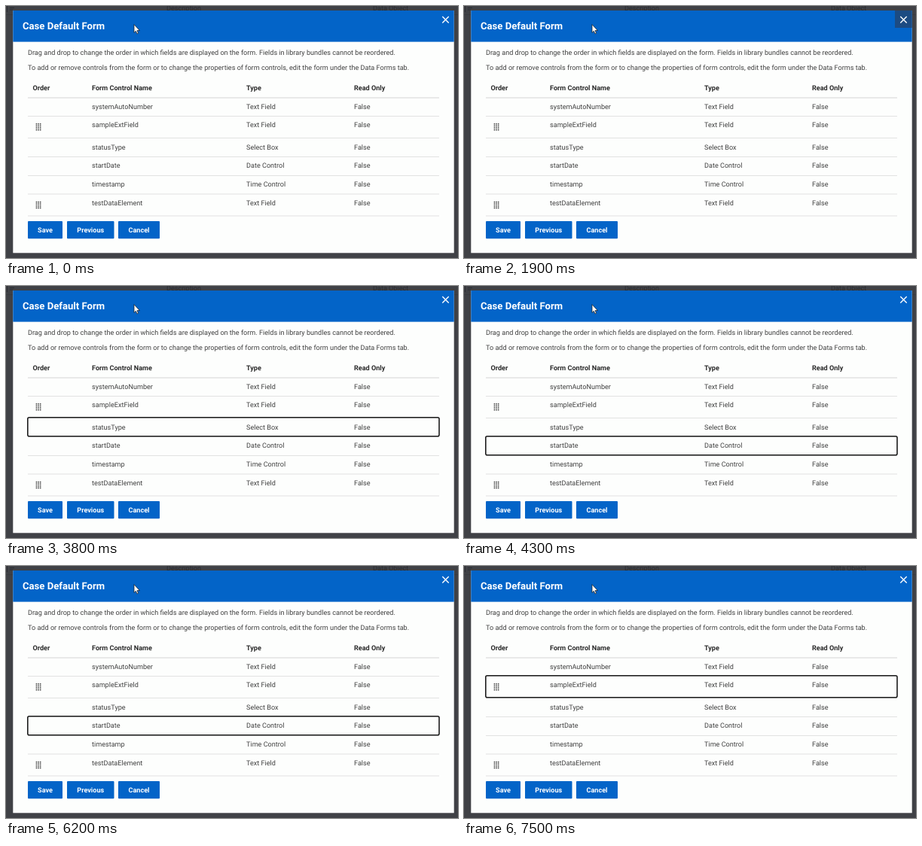
Recreate the animation shown at these times as an HTML page. Size 600x335 px, loop 8 s.

```html
<!DOCTYPE html>
<html lang="en">
<head>
<meta charset="utf-8">
<title>Case Default Form</title>
<style>
  html, body { margin: 0; width: 100%; height: 100%; overflow: hidden; background: #404146; }
  svg { display: block; width: 600px; height: 335px; }
  text { font: 9.1px Roboto, sans-serif; fill: #404040; text-rendering: geometricPrecision; }
  .head { font-weight: 700; fill: #2a2a2a; }
  .title { font-size: 13.1px; font-weight: 700; fill: #fff; }
  .button { font-weight: 700; fill: #fff; text-anchor: middle; }
  .behind { fill: #2b2d31; }
</style>
</head>
<body>
<svg id="stage" viewBox="0 0 600 335"></svg>
<script>
const LOOP = 8000;
const COLUMNS = [35.4, 114, 319, 462];
const LINES = [122, 146.5, 175.5, 200.5, 225.5, 250, 279];
const ROWS = [
  ['systemAutoNumber', 'Text Field', 136.8],
  ['sampleExtField', 'Text Field', 161.2, 160.8],
  ['statusType', 'Select Box', 190.6],
  ['startDate', 'Date Control', 215.4],
  ['timestamp', 'Time Control', 240],
  ['testDataElement', 'Text Field', 264.8, 264.6]
];
// [time, focused row]; -1 is the close button, null is nothing
const FOCUS = [
  [0, null], [1500, -1], [2200, 0], [3300, 1], [3700, 2], [4100, 3],
  [4700, 4], [5000, 5], [5700, 4], [6000, 3], [6600, 2], [7000, 1]
];

const stage = document.getElementById('stage');

function add(name, attrs, content = '') {
  const node = document.createElementNS('http://www.w3.org/2000/svg', name);
  for (const key in attrs) node.setAttribute(key, attrs[key]);
  node.textContent = content;
  return stage.appendChild(node);
}
const box = (x, y, width, height, fill, rx = 0) => add('rect', { x, y, width, height, fill, rx });
const label = (x, y, content, kind = '') => add('text', { x, y, class: kind }, content);

// Dimmed page and dialog
box(0, 0, 600, 335, '#404146');
label(213, 5.5, 'Description', 'behind');
label(487, 5.5, 'Data Object', 'behind');
add('path', { d: 'M1.5 0V8M5 2.5H11M5 5H9', stroke: '#2b2d31', fill: 'none' });
box(0, 11, 600, 1, '#393b3f');
box(9.3, 6, 585.4, 322.3, '#fdfefd');
box(9.3, 6, 585.4, 41.6, '#0364c8');
label(22, 31.1, 'Case Default Form', 'title');
const closeGlow = box(572, 6, 22.7, 23, '#1c4b82');
add('path', { d: 'M579.3 14.1l8.4 8.4m0-8.4l-8.4 8.4', stroke: '#fff', 'stroke-width': 1.4 });

label(29, 65.2, 'Drag and drop to change the order in which fields are displayed on the form. Fields in library bundles cannot be reordered.');
label(29, 85.4, 'To add or remove controls from the form or to change the properties of form controls, edit the form under the Data Forms tab.');

// Table
['Order', 'Form Control Name', 'Type', 'Read Only'].forEach((t, i) => label(COLUMNS[i], 112, t, 'head'));
LINES.forEach((y, i) => box(29, y - 0.5, 546, 1, i ? '#e2e2e2' : '#d6d6d6'));
for (const [name, type, y, grip] of ROWS) {
  [name, type, 'False'].forEach((t, i) => label(COLUMNS[i + 1], y, t));
  if (!grip) continue;
  for (let i = 0; i < 12; i++) {
    box(39.7 + (i % 3) * 2.6, grip - 4.7 + Math.floor(i / 3) * 2.6, 1.5, 1.5, '#2b2b2b');
  }
}

for (const [x, width, name] of [[29, 46, 'Save'], [81, 62.5, 'Previous'], [149, 55, 'Cancel']]) {
  box(x, 286, width, 23.3, '#0364c8', 1);
  label(x + width / 2, 300.8, name, 'button');
}

const ring = add('rect', { x: 28.8, width: 546.2, rx: 2, fill: 'none', stroke: '#1c1c1c', 'stroke-width': 1.6 });
add('path', {
  d: 'M170 24.6V35.4L172.4 33.2L173.9 36.9L175.6 36.2L174.1 32.6H177.4Z',
  fill: '#fff', stroke: '#111', 'stroke-width': 0.7
});

const fade = (t, start) => Math.min(1, Math.max(0, (t - start) / 150));

function draw(now) {
  const t = now % LOOP;
  const row = FOCUS.findLast(([start]) => t >= start)[1];
  const focused = row !== null && row >= 0;
  ring.setAttribute('visibility', focused ? 'visible' : 'hidden');
  if (focused) {
    ring.setAttribute('y', LINES[row] - 0.8);
    ring.setAttribute('height', LINES[row + 1] - LINES[row]);
  }
  closeGlow.setAttribute('opacity', fade(t, 1500) - fade(t, 2200));
  requestAnimationFrame(draw);
}
requestAnimationFrame(draw);
</script>
</body>
</html>
```
